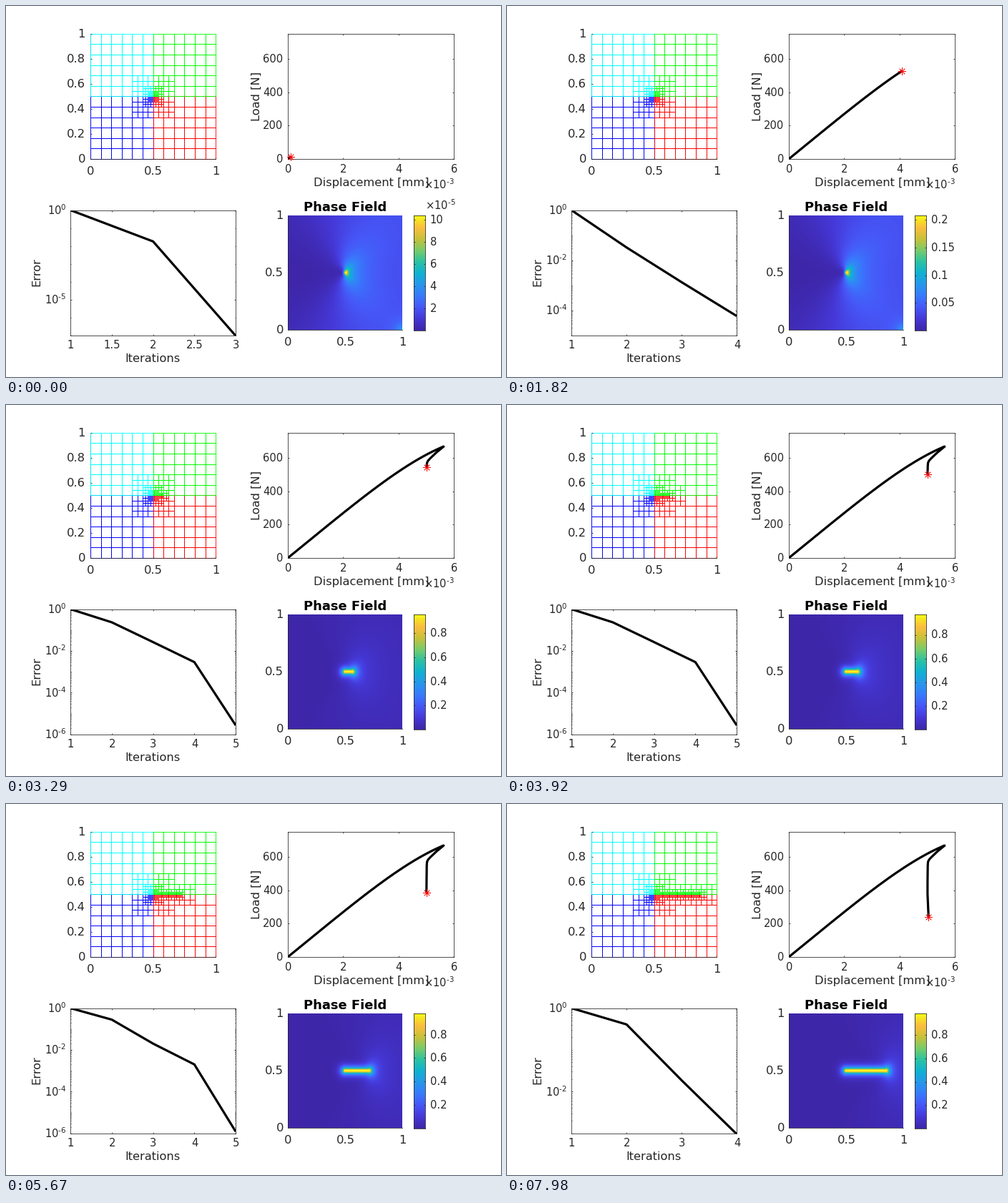
Write a matplotlib script that moves like this. It is 692 by 519 pixels and loops after 8 s.

```python
import math

import numpy as np
import matplotlib.pyplot as plt
from matplotlib.animation import FuncAnimation
from matplotlib.collections import PolyCollection
from matplotlib.colors import LinearSegmentedColormap

W, H, DPI = 692, 519, 100
PX = 72 / DPI            # points per pixel
STEPS, LOOP = 115, 8000
INK = '#262626'
SMALL, BIG = 14.7, 16.4  # tick label sizes in pixels

plt.rcParams.update({
    'font.family': 'DejaVu Sans',
    'mathtext.fontset': 'dejavusans',
    'mathtext.default': 'regular',
    'axes.linewidth': 0.8 * PX,
    'axes.edgecolor': INK,
})
PARULA = LinearSegmentedColormap.from_list('blue_yellow', [
    (0, '#3e26a8'), (.1, '#4538d7'), (.2, '#4757f7'), (.3, '#387afd'),
    (.4, '#2797eb'), (.5, '#10b1d2'), (.6, '#2cc3a2'), (.7, '#7acc69'),
    (.8, '#c9c13a'), (.9, '#febe3d'), (.95, '#f5dc27'), (1, '#f9fb15')])

fig = plt.figure(figsize=(W / DPI, H / DPI), dpi=DPI, facecolor='white')


def panel(left, top, right, bottom, xlim, ylim, box=True):
    ax = fig.add_axes([left / W, 1 - bottom / H,
                       (right - left) / W, (bottom - top) / H])
    ax.set(xlim=xlim, ylim=ylim, facecolor='white')
    ax.tick_params(which='both', direction='in', color=INK, width=0.8 * PX,
                   length=2.4 * PX, top=box, right=box,
                   labelleft=False, labelbottom=False)
    ax.tick_params(which='minor', length=1.4 * PX)
    if not box:
        ax.spines[['top', 'right']].set_visible(False)
    return ax


def text(x, y, s, size=SMALL, ha='center', color=INK, **kw):
    """Text whose digits are centred on pixel row y."""
    return fig.text(x / W, 1 - (y + 0.365 * size) / H, s, fontsize=size * PX,
                    ha=ha, va='baseline', color=color, **kw)


def side_text(x, y, s):
    fig.text(x / W, 1 - y / H, s, fontsize=16.2 * PX, color=INK, rotation=90,
             rotation_mode='anchor', ha='center', va='baseline')


def power(n, sign=''):
    return f'{sign}10$^{{\\text{{{n}}}}}$'


# ---- mesh -----------------------------------------------------------------
mesh_ax = panel(118.1, 38.9, 293.1, 213.9, (0, 1), (0, 1), box=False)
mesh_ax.set_xticks([0, .5, 1])
mesh_ax.set_yticks(np.arange(0, 1.1, .2))
mesh_ax.spines['left'].set_zorder(.5)
for v in (0, .5, 1):
    text(118 + 175 * v, 230, f'{v:g}', BIG)
for v in (0, .2, .4, .6, .8, 1):
    text(111, 213.5 - 175 * v, f'{v:g}', BIG, 'right')

quads = []
for color in ('blue', 'cyan', 'red', 'lime'):
    quad = PolyCollection([], facecolors='none', edgecolors=color,
                          linewidths=0.85 * PX, clip_on=False)
    mesh_ax.add_collection(quad, autolim=False)
    quads.append(quad)


def cells(tip):
    """Centres and sizes of a grid refined around the notch and the crack."""
    size = 1 / 12
    mid = (np.arange(12) + .5) * size
    c = np.array(np.meshgrid(mid, mid)).reshape(2, -1).T
    done = []
    for _ in range(3):
        dx, dy = c[:, 0] - .5, c[:, 1] - .5
        ahead = np.maximum(np.maximum(-dx, c[:, 0] - tip), 0)
        split = ((np.hypot(dx, dy) < 2.2 * size)
                 | (np.hypot(ahead, dy) < 1.45 * size))
        done.append((c[~split], size))
        size /= 2
        corners = np.array([(-1, -1), (1, -1), (-1, 1), (1, 1)]) * size / 2
        c = (c[split][:, None] + corners).reshape(-1, 2)
    done.append((c, size))
    return done


def draw_mesh(tip):
    square = np.array([(-.5, -.5), (.5, -.5), (.5, .5), (-.5, .5)])
    polys = [c[:, None] + square * s for c, s in cells(tip)]
    polys = np.concatenate(polys)
    mid = polys.mean(axis=1)
    part = 2 * (mid[:, 0] > .5) + (mid[:, 1] > .5)
    for i, quad in enumerate(quads):
        quad.set_verts(polys[part == i])


# ---- load against displacement ---------------------------------------------
load_ax = panel(394.1, 38.9, 626.1, 213.9, (0, 6), (0, 750))
load_ax.set_xticks([0, 2, 4, 6])
load_ax.set_yticks([0, 200, 400, 600])
for v in (0, 2, 4, 6):
    text(394.5 + 232 * v / 6, 227.5, f'{v}')
for v in (0, 200, 400, 600):
    text(387, 213.5 - 175 * v / 750, f'{v}', ha='right')
text(510.5, 246.5, 'Displacement [mm]', 16.2)
text(627, 250.5, power(-3, '×'), ha='right')
side_text(355, 126, 'Load [N]')
load_line, = load_ax.plot([], [], color='black', lw=3.2 * PX,
                          solid_joinstyle='round', solid_capstyle='butt')
star, = load_ax.plot([], [], ls='', marker=(8, 2, 0), ms=10.5 * PX, mec='red',
                     mew=0.7 * PX, clip_on=False, zorder=5)

PEAK = 34
RISE = [0, 14, 16, 29, PEAK], [.1, 1.5, 1.9, 4.75, 5.63]
FALL_T = [34, 35, 36, 37, 38.5, 41, 45, 56, 81, 96, 114]
FALL_U = [5.63, 5.54, 5.38, 5.18, 5.07, 5.03, 5.02, 5.015, 5.01, 5.025, 5.05]
FALL_P = [668, 655, 634, 603, 584, 571, 553, 500, 387, 320, 239]


def response(t):
    u = np.interp(t, *RISE)
    p = 135.4 * u - .0939 * u ** 4
    late = t > PEAK
    return (np.where(late, np.interp(t, FALL_T, FALL_U), u),
            np.where(late, np.interp(t, FALL_T, FALL_P), p))


def draw_load(k):
    u, p = response(np.linspace(0, k, 4 * k + 1))
    load_line.set_data(np.r_[0, u], np.r_[0, p])
    star.set_data(u[-1:], p[-1:])


# ---- convergence -----------------------------------------------------------
err_ax = panel(90.1, 285.6, 321.1, 460.6, (1, 3), (-7, 0))
text(205.5, 492.5, 'Iterations', 16.2)
side_text(47, 372, 'Error')
err_line, = err_ax.plot([], [], color='black', lw=3.2 * PX,
                        solid_joinstyle='round', solid_capstyle='butt')


def mix(a, b, s):
    return np.array(a) * (1 - s) + np.array(b) * s


def errors(k):
    """Base-10 logarithm of the error after each iteration."""
    if k <= 16:
        return mix([0, -1.75, -7.03], [0, -2.85, -5.35], k / 16)
    if k <= 45:
        if k <= 37:
            s = (k - 16) / 21
            n, end = 3 + round(8 * s ** 3), -5.35 + 2.35 * s
        else:
            n, end = max(5, 11 - (k - 37)), -3
        return end * np.linspace(0, 1, n) ** .95
    if k < 90:
        s = min(max((k - 56) / 25, 0), 1)
        return mix([0, -.63, -1.58, -2.54, -5.57],
                   [0, -.55, -1.7, -2.7, -5.92], s)
    s = min(max((k - 96) / 18, 0), 1)
    return mix([0, -.69, -1.79, -3], [0, -.39, -1.73, -3.02], s)


def draw_errors(k):
    e = errors(k)
    n = len(e)
    first = 0 if n > 10 else 1
    if n == 3:
        xt = np.arange(1, 3.1, .5)
    elif n <= 6:
        xt = np.arange(1, n + 1)
    else:
        xt = np.arange(0, n + 1, 5) if n > 10 else np.arange(2, n + 1, 2)
    low = math.floor(e[-1] + .05)
    yt = np.arange(0, low - 1, -5 if low < -6 else -2)
    minor = np.arange(low, 1)
    if low >= -6:
        minor = (np.arange(low, 0)[:, None]
                 + np.log10(np.arange(1, 10))).ravel()
    err_ax.set_xticks(xt)
    err_ax.set_yticks(yt)
    err_ax.set_yticks(minor, minor=True)
    err_ax.set(xlim=(first, n), ylim=(low, 0))
    err_line.set_data(np.arange(1, n + 1), e)
    for v in xt:
        live.append(text(90.5 + 231 * (v - first) / (n - first), 473.5,
                         f'{v:g}'))
    for v in yt:
        live.append(text(84.5, 286.5 + 175 * v / low, power(v), ha='right'))


# ---- phase field -----------------------------------------------------------
text(474.5, 280.5, 'Phase Field', 17.9, color='black', weight='bold')
phase_ax = panel(394.1, 292.9, 554.1, 452.9, (0, 1), (0, 1), box=False)
for v in (0, .5, 1):
    text(394.5 + 160 * v, 469, f'{v:g}', BIG)
    text(388, 452.5 - 160 * v, f'{v:g}', BIG, 'right')
N = 160
grid = (np.arange(N) + .5) / N
X, Y = np.meshgrid(grid, grid)
image = phase_ax.imshow(np.zeros((N, N)), cmap=PARULA, vmin=0, vmax=1,
                        origin='lower', extent=(0, 1, 0, 1), aspect='auto')
phase_ax.set_xticks([])
phase_ax.set_yticks([])

bar_ax = panel(570.1, 292.9, 586.1, 453.9, (0, 1), (0, 1))
bar_ax.imshow(np.linspace(0, 1, 256)[:, None], cmap=PARULA, origin='lower',
              extent=(0, 1, 0, 1), aspect='auto')
bar_ax.set_xticks([])


def lobes(tip):
    """Distance from the tip and strength of the two lobes ahead of it."""
    dx, dy = X - tip, Y - .5
    r = np.hypot(dx, dy) + 1e-9
    c = dx / r
    return r, (1 + c) / 2 * (1 + .6 * (1 - c * c))


def field(k, tip):
    b = min(max((k - 28) / 14, 0), 1)
    b = b * b * (3 - 2 * b)
    corner = np.exp(-np.hypot(X - 1, Y) / .05)
    out = 0
    if b < 1:
        r, f = lobes(.505)
        core = np.exp(-(r / .018) ** 2)
        near = (.06 + .94 * f) * .04 / (r + .045)
        far = .13 * f * r / (r + .15)
        early = core + (1 - core) * (near + far) + .28 * corner
        out = (1 - b) * np.minimum(early, 1)
    if b > 0:
        r, f = lobes(tip)
        ahead = np.maximum(np.maximum(.5 - X, X - tip), 0)
        gap = np.maximum(np.hypot(ahead, Y - .5) - .006, 0)
        crack = np.exp(-gap / .025)
        fan = .24 * f / (1 + r / .08)
        out = out + b * (crack + (1 - crack) * fan)
    return out


def top_value(k):
    if k <= PEAK:
        u = np.interp(k, *RISE)
        return .0104 * u * u * (1 + .7 * (u / 5.63) ** 4)
    return np.interp(k, [34, 35, 36, 37, 41, 56, 81, 114],
                     [.56, .71, .83, .907, .945, .973, .981, .985])


def draw_phase(k, tip):
    image.set_data(field(k, tip))
    top = top_value(k)
    base = 10.0 ** math.floor(math.log10(top) - 1)
    step = next(m * base for m in (1, 2, 5, 10, 20, 50) if top / (m * base) <= 6)
    ticks = np.arange(1, int(top / step + 1e-9) + 1) * step
    bar_ax.set_yticks(ticks / top)
    unit = 1
    if top < .02:
        e = math.floor(math.log10(step) + 1e-9)
        unit = 10.0 ** e
        live.append(text(586, 279.5, power(e, '×'), ha='left'))
    for v in ticks:
        live.append(text(592.5, 453.5 - 161 * v / top, f'{v / unit:.4g}',
                         ha='left'))


# ---- animation -------------------------------------------------------------
live = []


def update(k):
    while live:
        live.pop().remove()
    tip = np.interp(k, [0, 30, 37, 56, 81, 96, 114],
                    [.5, .505, .525, .6, .71, .775, .85])
    draw_mesh(tip)
    draw_load(k)
    draw_errors(k)
    draw_phase(k, tip)
    return []


anim = FuncAnimation(fig, update, frames=STEPS, interval=LOOP / STEPS,
                     init_func=lambda: update(0), repeat=True,
                     cache_frame_data=False)
plt.show()
```
